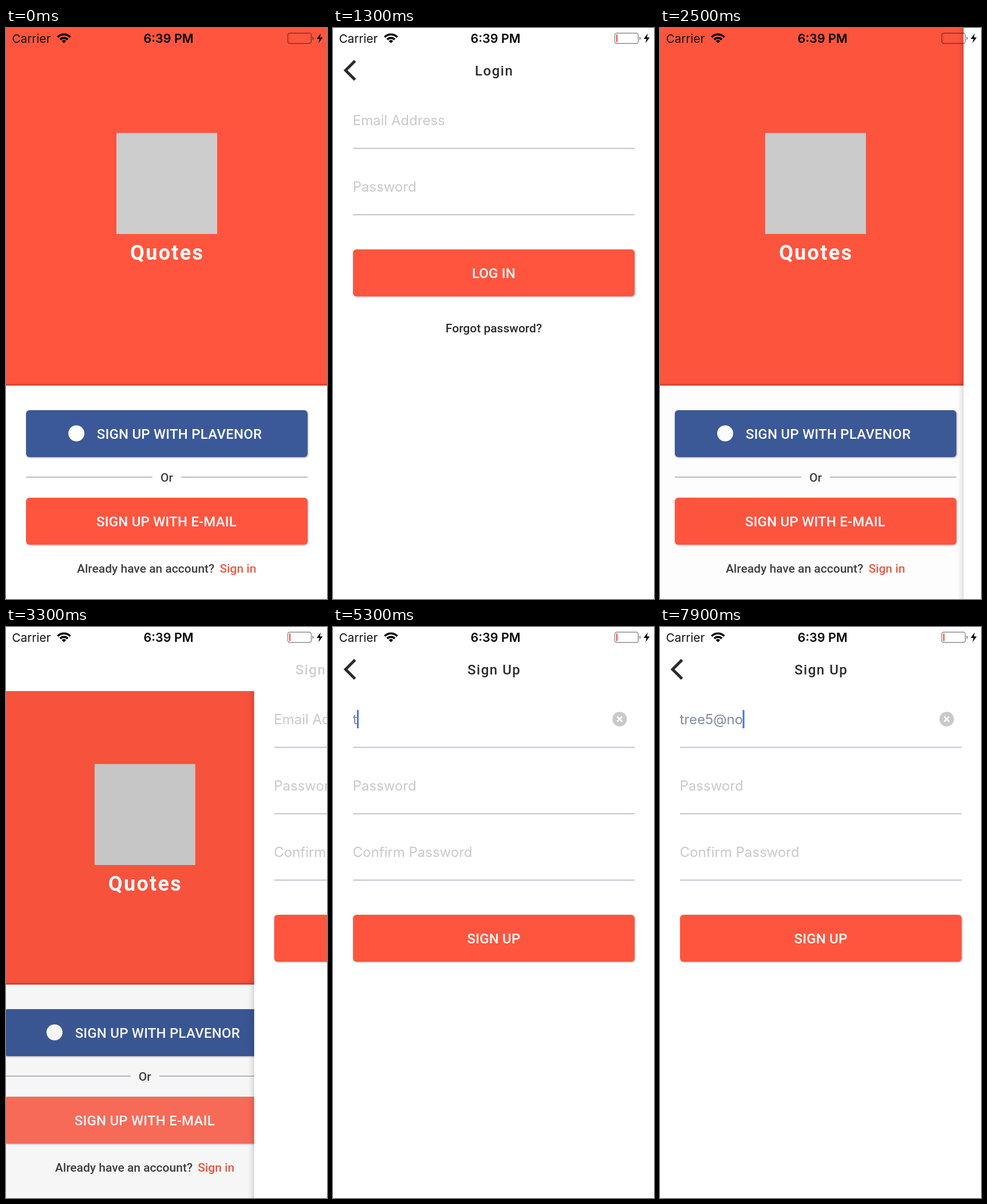
Write an HTML page that moves like this. It is 561 by 998 pixels and loops after 8000 ms.

```html
<!DOCTYPE html>
<html lang="en">
<head>
<meta charset="utf-8">
<title>Sign up flow</title>
<style>
  html, body { margin: 0; width: 100%; height: 100%; overflow: hidden; background: #fff; }
  svg { display: block; }
  text { font: 500 21px Roboto, sans-serif; fill: #2b2b2b; white-space: pre; }
  .mid { text-anchor: middle; }
  .caps { font-size: 24px; letter-spacing: .2px; fill: #fff; }
  .heading { font-size: 24px; letter-spacing: 1.5px; }
  .brand { font-size: 36px; font-weight: 700; letter-spacing: 2.3px; fill: #fff; }
  .link { fill: #f2583f; }
  .soft { fill: #3f3f41; }
  .field { font: 400 24px Inter, sans-serif; fill: #c9c9cc; }
  .field.typed { fill: #828a9c; }
  .clock { font: 600 21.5px Inter, sans-serif; fill: #000; }
  .carrier { font: 400 20.7px Inter, sans-serif; fill: #111; }
  .button { filter: drop-shadow(1.5px 1.5px 1.5px rgba(0, 0, 0, .35)); }
  .panel { filter: drop-shadow(0 -1px 2px rgba(0, 0, 0, .4)); }
  .sheet { filter: drop-shadow(0 0 6px rgba(0, 0, 0, .25)); }
  .rule { stroke: #b9bbc9; stroke-width: 1.8; }
</style>
</head>
<body>
<svg id="stage" width="561" height="998" viewBox="0 0 561 998"></svg>
<script>
const W = 561, H = 998, HEADER = 112, RED = '#ff553e';
const FORM = [['Email Address', 161], ['Password', 277], ['Confirm Password', 393]];

const text = (x, y, cls, str, id = '') => `<text id="${id}" x="${x}" y="${y}" class="${cls}">${str}</text>`;
const rect = (x, y, w, h, fill, more = '') =>
  `<rect x="${x}" y="${y}" width="${w}" height="${h}" fill="${fill}" ${more}/>`;
const rule = (x1, x2, y) => `<path class="rule" d="M${x1} ${y}H${x2}"/>`;
const button = (y, fill) => rect(35, y, 492, 82, fill, 'rx="6" class="button"');

const form = (id, fields, label, y) => `<g id="${id}">
  ${fields.map(([name, mid], i) =>
    text(34.5, mid + 8.5, 'field', name, id + i) + rule(35, 527, mid + 49.3)).join('')}
  ${button(y, RED)}${text(281, y + 50, 'caps mid', label)}</g>`;

const welcome = `<g id="welcome">
  ${rect(0, 0, W, H, RED)}
  <g id="art">${rect(193, 183.5, 176, 176.5, '#cdcdcd')}${text(281.7, 405, 'brand mid', 'Quotes')}</g>
  ${rect(-5, 625, W + 10, H - 625, '#fff', 'class="panel"')}
  ${button(668, '#3b5998')}<circle cx="123" cy="708.5" r="14" fill="#fff"/>
  ${text(303, 717.7, 'caps mid', 'SIGN UP WITH PLAVENOR')}
  ${rule(35, 256, 785)}${text(281, 793, 'mid soft', 'Or')}${rule(306, 527, 785)}
  <g id="mailButton">${button(821, RED)}${text(280.5, 870.7, 'caps mid', 'SIGN UP WITH E-MAIL')}</g>
  ${text(124, 951.5, 'soft', 'Already have an account?')}${text(373.5, 951.5, 'link', 'Sign in', 'signIn')}
  ${rect(0, 0, W, H, '#000', 'id="dim"')}</g>`;

const sheet = `<g id="sheet">${rect(0, -20, W, H + 40, '#fff', 'class="sheet"')}<g id="content">
  <g id="loginPage">${form('login', FORM.slice(0, 2), 'LOG IN', 387)}
    ${text(281, 532, 'mid', 'Forgot password?')}</g>
  <g id="joinPage">${form('join', FORM, 'SIGN UP', 503)}
    <g id="clear"><circle cx="501" cy="161" r="12.7" fill="#c9c9cb"/>
      <path d="M496.5 156.5l9 9m0-9l-9 9" stroke="#fff" stroke-width="2.6"/></g>
    ${rect(35, 145, 3, 32, '#4a70e0', 'id="caret"')}</g></g></g>`;

const header = `<g id="header">${rect(0, 0, W, HEADER, '#fff')}
  <path id="back" d="M38.5 57.5L22 74l16.5 16.5" fill="none" stroke="#2a2a2c" stroke-width="5"/>
  ${text(281.7, 82.5, 'heading mid', '', 'title')}</g>`;

const arc = r => `M${-r * .72} ${-r * .69}A${r} ${r} 0 0 1 ${r * .72} ${-r * .69}`;
const statusBar = `${text(10.5, 25.7, 'carrier', 'Carrier')}
  <g transform="translate(101.3 26.5)"><path d="${arc(15.3)}${arc(9.2)}" fill="none" stroke="#000" stroke-width="3.7"/>
    <path d="${arc(5.4)}L0 0z"/></g>
  ${text(284, 25.7, 'clock mid', '6:39 PM')}
  <g fill="none" stroke="#000" stroke-opacity=".45" stroke-width="1.5">
    <rect x="492.5" y="9" width="41" height="18" rx="3.5"/></g>
  <path d="M535.5 15q2.5 1 2.5 3t-2.5 3z" fill-opacity=".45"/>
  ${rect(495, 11.5, 2.2, 13, '#ff4a38')}
  <path d="M550 9.5L543 19h5l-2 7.5 7.5-10h-4.8z"/>`;

document.getElementById('stage').innerHTML = welcome + sheet + header + statusBar;

const $ = id => document.getElementById(id);
const set = (id, name, value) => $(id).setAttribute(name, value);
const move = (id, x, y) => set(id, 'transform', `translate(${x} ${y})`);
const show = (id, on) => set(id, 'display', on ? 'inline' : 'none');

// cubic-bezier(.2833, .99, .31833, .99) over 500 ms
function slide(ms) {
  const x = Math.min(Math.max(ms / 500, 0), 1);
  const curve = (s, a, b) => 3 * (1 - s) * s * ((1 - s) * a + s * b) + s ** 3;
  let lo = 0, hi = 1;
  for (let i = 0; i < 24; i++) {
    const s = (lo + hi) / 2;
    if (curve(s, .2833, .31833) < x) lo = s; else hi = s;
  }
  return x === 0 || x === 1 ? x : curve(lo, .99, .99);
}

const LOGIN = 667, POP = 2264, JOIN = 3267, FOCUS = 4500;
const typed = 'tree5@no', keys = [5300, 5500, 5700, 6300, 6500, 7300, 7700, 7900];

function drawTyping(t) {
  const count = keys.filter(k => t >= k).length;
  const field = $('join0');
  field.textContent = count ? typed.slice(0, count) : FORM[0][0];
  field.classList.toggle('typed', count > 0);
  show('clear', count > 0);
  const lastInput = count ? keys[count - 1] : FOCUS;
  show('caret', t >= FOCUS && t - lastInput < 600);
  set('caret', 'x', count ? 34 + field.getComputedTextLength() : 35);
}

function draw(t) {
  const login = t < 3000, popping = login && t >= POP;
  const start = login ? LOGIN : JOIN;
  const p = popping ? 1 - slide(t - POP) : slide(t - start);
  const hasHeader = t >= start && !popping;

  move('welcome', -.3 * p * W, 0);
  move('art', 0, hasHeader ? HEADER / 2 : 0);
  set('dim', 'opacity', .15 * p);
  set('signIn', 'opacity', t >= 500 && t < LOGIN ? .2 : t >= LOGIN && t < 800 ? .85 : 1);
  set('mailButton', 'opacity', t >= JOIN && t < 3400 ? .85 : 1);

  show('sheet', p > 0);
  move('sheet', (1 - p) * W, 0);
  move('content', 0, hasHeader ? 0 : -HEADER);
  show('loginPage', login);
  show('joinPage', !login);

  show('header', hasHeader);
  $('title').textContent = login ? 'Login' : 'Sign Up';
  move('title', (1 - p) * 350, 0);
  set('title', 'opacity', p);
  set('back', 'opacity', Math.max(0, 2 * p - 1));
  drawTyping(t);
}

const begin = performance.now();
function tick() {
  const t = (performance.now() - begin) % 8000;
  // The screen refreshes five times a second, on the odd tenths.
  draw(Math.floor((t - 100) / 200) * 200 + 100);
  requestAnimationFrame(tick);
}
tick();
</script>
</body>
</html>
```
